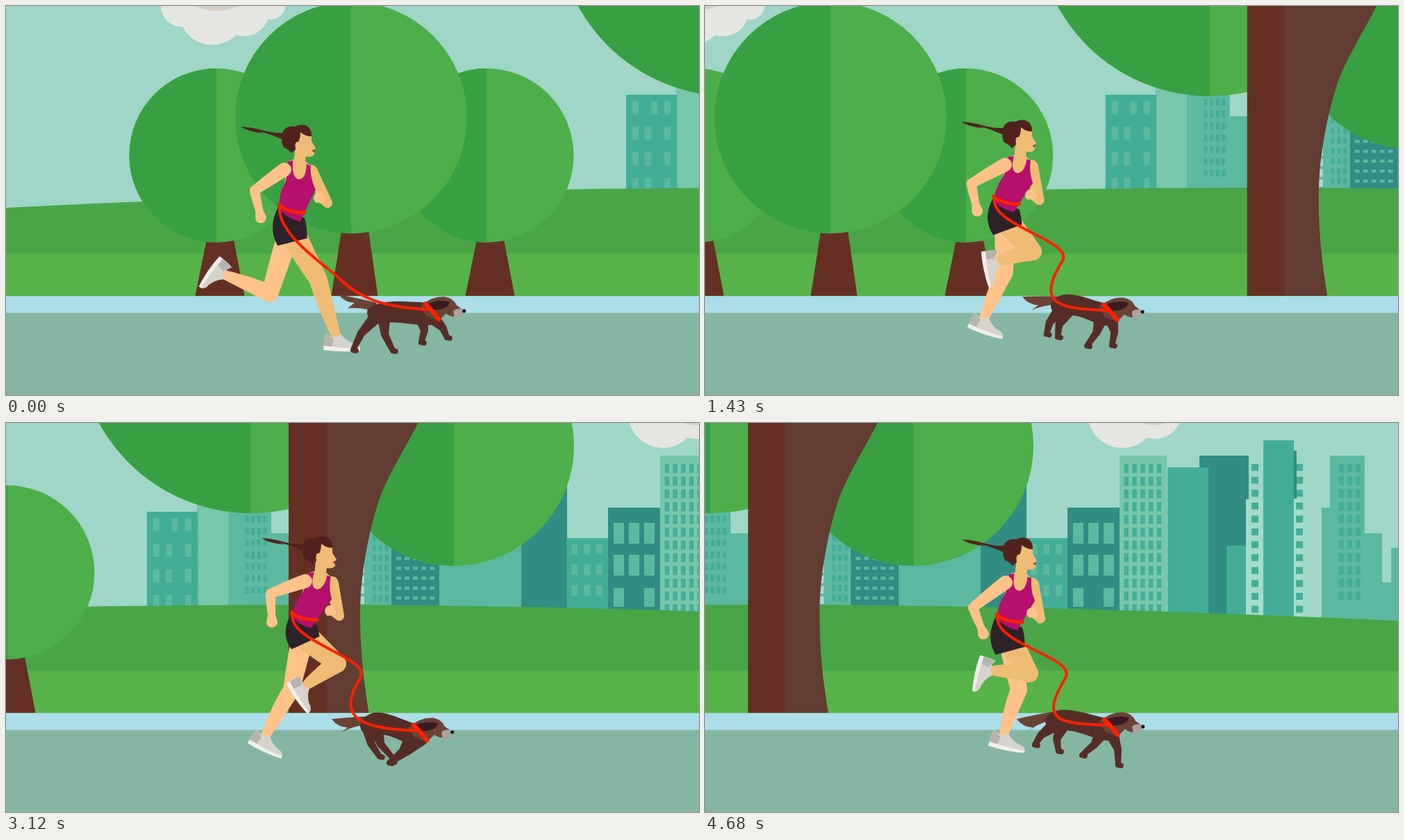
Animation of 998x561 px, one loop 4.81 s. Source, as an HTML page:

```html
<!DOCTYPE html>
<html lang="en">
<head>
<meta charset="utf-8">
<title>Park run</title>
<style>
html,body{margin:0;width:100%;height:100%;overflow:hidden;background:#9fd6c7}
svg{display:block;width:100%;height:100%}
</style>
</head>
<body>
<svg id="stage" viewBox="0 0 998 561" preserveAspectRatio="xMidYMid slice"></svg>
<script>
const STEP = 130, FRAMES = 37, SPEED = 28.75, CYCLE = 19;
const C = {
  leaf: '#38a042', leafLit: '#4dae4b', trunk: '#643023', trunkLit: '#603c31',
  deep: '#318c84', teal: '#44ad98', mid: '#5cb8a0', pale: '#78c6ab', white: '#a6dbcc',
  skin: '#ffc38a', tan: '#efbc76', hair: '#50221e', top: '#b4106c', shorts: '#2e2229',
  red: '#ff2000', coat: '#552d26', coatLit: '#6b4335'
};

// ---- scenery -------------------------------------------------------------
const rect = (fill, x, y, w, h) => `<rect x="${x}" y="${y}" width="${w}" height="${h}" fill="${fill}"/>`;
const disc = (fill, x, y, r) => `<circle cx="${x}" cy="${y}" r="${r}" fill="${fill}"/>`;
const shape = (fill, d) => `<path fill="${fill}" d="${d}"/>`;
const tower = (fill, x0, x1, y) => rect(fill, x0, y, x1 - x0, 310 - y);

function panes(fill, x, y, cols, rows, dx, dy, w, h) {
  let d = '';
  for (let i = 0; i < cols * rows; i++)
    d += `M${x + i % cols * dx} ${y + Math.floor(i / cols) * dy}h${w}v${h}h${-w}z`;
  return shape(fill, d);
}

const crown = (x, y, r) => disc(C.leafLit, x, y, r) +
  shape(C.leaf, `M${x} ${y - r}A${r} ${r} 0 0 0 ${x} ${y + r}z`);
const tree = (x, y, r, foot) => shape(C.trunk,
  `M${x - 14} ${y + r - 4}h39L${x + 5 + foot} 418H${x + 5 - foot}z`) + crown(x, y, r);
const cloud = (x, y, r) => disc('#e6e6e2', x, y, r) +
  disc('#e6e6e2', x + r * .95, y - r * .1 + 4, r * .76) + disc('#e6e6e2', x + r * 1.75, y - 10, r * .45);

function scenery() {
  return cloud(297, 8, 48) + disc('#e6e6e2', 253, 0, 30) + disc('#d5cfc6', 303, -65, 72) +
    cloud(1636, -14, 50) + disc('#d5cfc6', 1683, -57, 60) +

    tower(C.pale, 965, 1010, 118) + tower(C.teal, 893, 966.5, 128) +
    panes(C.mid, 902, 137, 1, 4, 0, 37, 9, 19) + panes(C.mid, 948, 137, 1, 4, 0, 37, 9, 19) +
    panes(C.mid, 929, 137, 1, 1, 0, 0, 9, 19) + panes(C.mid, 920, 174, 1, 3, 0, 37, 9, 19) +
    tower(C.mid, 1010, 1072, 100) + panes(C.teal, 1034.5, 134, 4, 7, 8.7, 17, 5, 10) +
    tower(C.mid, 1072, 1245, 159) + panes(C.teal, 1218, 161, 3, 7, 8.8, 14.5, 5, 9) +
    panes(C.white, 1200, 190, 1, 5, 0, 15, 6, 11) +
    tower(C.deep, 1245, 1315, 165) + panes(C.mid, 1252, 193, 5, 5, 12, 14.3, 7, 4.5) +
    tower(C.mid, 1314, 1432, 150) + tower(C.deep, 1432, 1498, 60) +
    tower(C.teal, 1497.5, 1557, 166) + panes(C.mid, 1504, 174, 3, 3, 18, 30, 9, 15) +
    tower(C.deep, 1557, 1632, 122) + panes(C.mid, 1565, 144, 3, 2, 22, 46, 15, 30) +
    panes(C.mid, 1565, 238, 2, 1, 44, 0, 15, 27) +
    tower(C.pale, 1632, 1700, 47) + panes(C.teal, 1638.5, 59, 5, 12, 11.8, 18.4, 6.5, 13) +
    tower(C.deep, 1747, 1818, 47) + tower(C.teal, 1701, 1760, 64) + tower(C.teal, 1786, 1814, 177) +
    tower(C.white, 1814, 1896, 110) + panes(C.teal, 1822, 59, 2, 12, 64, 18.6, 10, 10) +
    tower(C.teal, 1839, 1883, 25) + rect(C.deep, 1883, 40, 4, 69) +
    tower(C.mid, 1923, 1936, 122) + tower(C.mid, 1935, 1985, 47) + tower(C.mid, 1984, 2010, 159) +
    tower(C.mid, 2009, 2024, 230) + tower(C.mid, 2023, 2050, 180) +
    panes(C.teal, 1948, 59, 3, 11, 12, 18.4, 7, 12) +

    shape('#49a546', 'M0 291Q575 262 1150 262Q1560 263 2050 286V360H0z') +
    rect('#57b24a', 0, 357, 2050, 62) + rect('#abdee9', 0, 418.3, 2050, 25) + rect('#85b6a4', 0, 442.6, 2050, 120) +
    tree(303, 215.5, 125.5, 35.5) + tree(692, 215.5, 125.5, 35.5) + tree(497, 161, 167, 33.5) +
    crown(1043, -119.5, 249.5) + crown(1335, 33, 173) +
    shape(C.trunkLit, 'M1140 0H1283.5C1262 42 1238 78 1226 115S1200 215 1200 275S1206 375 1212.5 418H1140z') +
    rect(C.trunk, 1097, 0, 54, 418);
}

// ---- key poses; "at" is the place in the cycle -------------------------------
// near and far leg: knee, ankle; right and left arm: elbow, fist
const runner = [
  {at: 0, head: [0, 0], waist: [411, 297], near: [450, 395, 476, 477], far: [380, 415, 313, 387],
   right: [358, 266, 367, 305], left: [463, 284, 451, 277]},
  {at: 5, head: [32, 6], waist: [430, 300], near: [405, 400, 361, 464], far: [490, 362, 443, 403],
   right: [437, 288, 473, 308], left: [383, 271, 412, 288]},
  {at: 7, head: [38, 4], waist: [434, 297], near: [403, 398, 345, 438], far: [497, 355, 482, 448],
   right: [491, 296, 509, 262], left: [384, 248, 407, 285]},
  {at: 11, head: [-8, 0], waist: [401, 294], near: [377, 386, 313, 384], far: [443, 375, 463, 455],
   right: [441, 297, 469, 272], left: [361, 236, 374, 276]},
  {at: 13, head: [32, -6], waist: [438, 286], near: [467, 361, 411, 357], far: [452, 385, 430, 450],
   right: [386, 266, 401, 304], left: [483, 282, 471, 274]},
  {at: 15, head: [30, -8], waist: [429, 283], near: [477, 347, 430, 380], far: [411, 385, 373, 452],
   right: [381, 246, 383, 287], left: [480, 278, 467, 271]}
];

// spine: rump, chest; paws: two hind, two front; arch of the back, rise of the tail
const stretch = {at: 4, spine: [518, 438, 593, 441], hind: [463, 480, 467, 479], front: [610, 491, 636, 482], form: [4, -33]};
const dog = [
  {at: 0, spine: [530, 440, 612, 442], hind: [500, 496, 557, 497], front: [598, 485, 635, 478], form: [0, -24]},
  stretch, {...stretch, at: 5},
  {at: 12, spine: [520, 435, 595, 448], hind: [538, 481, 556, 482], front: [552, 490, 556, 488], form: [14, -8]},
  {at: 17, spine: [500, 428, 574, 440], hind: [461, 468, 476, 474], front: [549, 490, 606, 490], form: [6, -14]},
  {at: 18, spine: [500, 428, 583, 440], hind: [475, 464, 509, 473], front: [543, 479, 595, 493], form: [8, -1]}
];

const clamp = v => Math.max(0, Math.min(1, v));
const mix = (a, b, f) => a.map((v, i) => v + (b[i] - v) * f);
const plus = ([x, y], dx, dy) => [x + dx, y + dy];

function poseAt(keys, p) {
  let i = keys.length - 1;
  while (keys[i].at > p) i--;
  const {at, ...a} = keys[i], b = keys[(i + 1) % keys.length];
  const f = (p - at) / ((b.at - at + CYCLE) % CYCLE);
  for (const k in a) a[k] = mix(a[k], b[k], f);
  return a;
}

// ---- drawing helpers -----------------------------------------------------
// tapered segment with round ends; swell thickens its rear side
function bone([x0, y0], [x1, y1], r0, r1, swell = 0) {
  const len = Math.hypot(x1 - x0, y1 - y0) || 1;
  const nx = (y0 - y1) / len, ny = (x1 - x0) / len;
  const off = (x, y, r) => `${x + nx * r} ${y + ny * r}`;
  const mx = x0 * .6 + x1 * .4, my = y0 * .6 + y1 * .4, r = r0 * .6 + r1 * .4;
  return `M${off(x0, y0, r0)}Q${off(mx, my, r + swell)} ${off(x1, y1, r1)}A${r1} ${r1} 0 0 0 ${off(x1, y1, -r1)}` +
    `L${off(x0, y0, -r0)}A${r0} ${r0} 0 0 0 ${off(x0, y0, r0)}z`;
}

const el = {};
const draw = (id, d) => el[id].setAttribute('d', d);
const paint = (id, fill) => el[id].setAttribute('fill', fill);
const move = (id, m) => el[id].setAttribute('transform', m);

// ---- scene graph ---------------------------------------------------------
const path = (id, fill) => `<path id="${id}" fill="${fill}"/>`;
const line = (id, w) => `<path id="${id}" fill="none" stroke="${C.red}" stroke-width="${w}" stroke-linecap="round"/>`;
const shoe = id => `<g id="${id}">` +
  shape('#d6d3cd', 'M-15 -5Q-4 5 6 -4Q15 8 28 10Q35 13 34 18L-18 17Q-19 5 -15 -5z') +
  shape('#b7b3ae', 'M-15 -4Q-8 1 -4 3L-7 15L-18 15Q-19 5 -15 -4z') +
  shape('#f0efec', 'M-18.5 13Q8 17 34 16.5V20Q8 23 -19 19z') + '</g>';
const FRONT = 'M-17 -2L-9 -3Q-8 22 4 24Q14 22 11 2L17 4Q20 24 30 39Q24 55 19 72L15 85Q0 82 -15 70Q-23 60 -18 36Q-12 24 -17 -2z';
const BACK = 'M-14 -2Q0 6 18 4Q20 24 30 38L21 78Q2 79 -18 74Q-21 55 -15 35Q-4 20 -14 -2z';

document.getElementById('stage').innerHTML =
  rect('#9fd6c7', 0, 0, 998, 561) + `<g id="world">${scenery()}</g>` +
  path('leftUpper', C.tan) + path('leftFore', C.tan) +
  path('far', C.skin) + shoe('farShoe') + path('near', C.tan) + shoe('nearShoe') +
  path('shorts', C.shorts) + path('pony', C.hair) +
  `<g id="torso">${shape(C.tan, 'M-17 -2L-8 -5L8 -3L17 4L28 40L-16 36z')}${path('top', C.top)}</g>` +
  '<g id="head">' +
  shape(C.tan, 'M418 181L440 184L440 195L446 205L443.500 208L444 214Q440 219 432 217L430 230L414 228L416 207L410 200z') +
  shape(C.hair, 'M397 191C396 178 406 172 416 174C426 168 441 172 440 188Q431 188 424 182Q424 191 421 196Q415 194 417 207L411 212Q405 205 400 204Q397 199 397 191z') +
  '<path id="lips" fill="#b5281f" d="M444.500 206L440.500 209L443.500 211z"/></g>' +
  path('leftFist', C.tan) + path('rightUpper', C.skin) + path('rightFore', C.skin) + path('rightFist', C.skin) + line('belt', 5) +
  path('tail', C.coatLit) + path('dogFar', C.coat) + path('body', C.coat) + path('dogNear', C.coat) +
  '<g id="dogHead">' +
  shape(C.coatLit, 'M-16 -8Q0 -24 18 -24Q31 -23 36 -13L44 -8L40 3Q28 5 22 0L12 11L-6 6z') +
  shape('#a8a39d', 'M32 -5Q40 -11 48 -7L48 -2Q44 6 34 5z') + disc('#1d1719', 47.5, -5.5, 2.6) +
  shape('#3a1b21', 'M-5 -13Q10 -20 26 -17Q25 -9 15 -6Q2 -2 -6 -5z') +
  `<path d="M-9 -12Q-2 -7 12 9" fill="none" stroke="${C.red}" stroke-width="6" stroke-linecap="round"/></g>` +
  line('leash', 4);
document.querySelectorAll('#stage [id]').forEach(e => el[e.id] = e);

// ---- figures -------------------------------------------------------------
function drawLeg(id, hip, [kx, ky, ax, ay], r0, r1) {
  const knee = [kx, ky], ankle = [ax, ay];
  draw(id, bone(hip, knee, r0, r1, 2) + bone(knee, ankle, r1, 6.5, 4));
  const lift = Math.atan2(kx - ax, ay - ky) * 180 / Math.PI;
  move(id + 'Shoe', `translate(${ankle}) rotate(${Math.max(0, lift * 1.2 - 12)})`);
}

function drawArm(id, shoulder, [ex, ey, fx, fy]) {
  const elbow = [ex, ey], fist = [fx, fy], wrist = mix(elbow, fist, .75);
  draw(id + 'Upper', bone(shoulder, elbow, 10, 7, 1));
  draw(id + 'Fore', bone(elbow, wrist, 7, 5.5, 1));
  draw(id + 'Fist', bone(wrist, fist, 5.5, 8));
}

// the hem tilts with the near thigh and rides up as the knee rises
function shortsPath(waist, hip, [kx, ky]) {
  const a = Math.atan2(kx - hip[0], ky - hip[1]), s = Math.sin(a), drop = 32 - 25 * s * s;
  const ux = Math.sin(a / 2), uy = Math.cos(a / 2);
  const hem = w => [hip[0] + ux * drop + uy * w, hip[1] + uy * drop - ux * w];
  return `M${plus(waist, -18, -9)}L${plus(waist, 19, 9)}Q${plus(waist, 22, 18)} ${hem(22)}` +
    `L${hem(2)}L${hem(-22)}Q${plus(hip, -30, 4)} ${plus(waist, -18, -9)}z`;
}

function ponyPath([x, y], v) {
  return `M${x} ${y - 5}C${x - 22} ${y - 4} ${x - 38} ${y + v} ${x - 60} ${y + v}` +
    `Q${x - 48} ${y + v + 8} ${x - 26} ${y + v * .7 + 5}L${x - 35} ${y + v * 1.2 + 9}` +
    `Q${x - 22} ${y + v * .8 + 6} ${x + 4} ${y + 6}z`;
}

function drawRunner(p) {
  const r = poseAt(runner, p);
  // 1 while the back is turned to the viewer
  const turn = clamp(.5 + 4 * (Math.cos((p - 7.8) / CYCLE * 2 * Math.PI) - .2)), back = turn > .5;
  const neck = plus(r.head, 422 - 6 * turn, 226 - 2 * turn), hip = plus(r.waist, -5, 18);
  drawLeg('near', hip, r.near, 19, 13);
  drawLeg('far', plus(hip, 5, 2), r.far, 16, 12);
  draw('shorts', shortsPath(r.waist, hip, r.near));
  drawArm('right', plus(neck, ...mix([-21, 10], [12, 17], turn)), r.right);
  drawArm('left', plus(neck, ...mix([17, 13], [-16, 10], turn)), r.left);
  paint('rightUpper', back ? C.tan : C.skin);
  paint('leftFist', back ? C.tan : C.skin);
  move('torso', `matrix(1 0 ${(r.waist[0] - neck[0]) / 71} ${(r.waist[1] - neck[1]) / 71} ${neck})`);
  draw('top', back ? BACK : FRONT);
  move('head', `translate(${r.head})`);
  el.lips.style.display = back ? 'none' : '';
  draw('pony', ponyPath(plus(r.head, 398, 188), -14 + 38 * turn));
  draw('belt', `M${plus(r.waist, -18, -10)}q12 11 37 11`);
  return r.waist;
}

function drawDog(p) {
  const d = poseAt(dog, p), [arch, rise] = d.form;
  const rump = d.spine.slice(0, 2), chest = d.spine.slice(2);
  const R = (x, y) => plus(rump, x, y), K = (x, y) => plus(chest, x, y);
  // hind legs fold backwards, front legs forwards
  const limb = (top, paw, fold) => {
    const joint = plus(mix(top, paw, .5), fold, 0);
    return bone(top, joint, 9.5, 5.5) + bone(joint, paw, 5.5, 4) + bone(paw, plus(paw, 4, 1), 4, 3.8);
  };
  draw('dogFar', limb(R(14, 10), d.hind.slice(2), -5) + limb(K(3, 8), d.front.slice(2), 4));
  draw('dogNear', limb(R(3, 8), d.hind.slice(0, 2), -5) + limb(K(-13, 9), d.front.slice(0, 2), 4));
  draw('body', `M${R(-9, -3)}C${R(8, -18 - arch)} ${K(-35, -16 - arch / 2)} ${K(-5, -14)}C${K(13, -6)} ${K(14, 10)} ${K(2, 18)}` +
    `C${K(-20, 20)} ${R(32, 13 - arch / 2)} ${R(6, 17)}Q${R(-14, 10)} ${R(-9, -3)}z`);
  draw('tail', `M${R(4, -12)}Q${R(-25, rise / 2 - 7)} ${R(-51, rise)}Q${R(-42, rise + 12)} ${R(-28, rise + 12)}` +
    `L${R(-38, rise + 20)}Q${R(-22, rise / 2 + 6)} ${R(0, 0)}z`);
  move('dogHead', `translate(${chest}) rotate(4)`);
  return K(0, -4);
}

// pulled straight at full length, sagging into an S when there is slack
function leashPath(waist, collar) {
  const slack = clamp((200 - collar[0] + waist[0]) / 8);
  const from = plus(waist, -17, -6), bend = [waist[0] + 67 + 14 * slack, 391 - 23 * slack];
  const [ox, oy] = mix([30, 30], [-40, 65], slack);
  return `M${from}C${plus(from, -2, 40)} ${plus(bend, -ox * .45, -oy * .45)} ${bend}` +
    `C${plus(bend, ox, oy)} ${plus(collar, -70, -3)} ${collar}`;
}

function render(n) {
  move('world', `translate(${-n * SPEED})`);
  draw('leash', leashPath(drawRunner(n * 3 % CYCLE), drawDog(n * 10 % CYCLE)));
}

let last = -1;
function tick(now) {
  const n = Math.floor(now / STEP) % FRAMES;
  if (n !== last) render(last = n);
  requestAnimationFrame(tick);
}
render(0);
requestAnimationFrame(tick);
</script>
</body>
</html>
```
